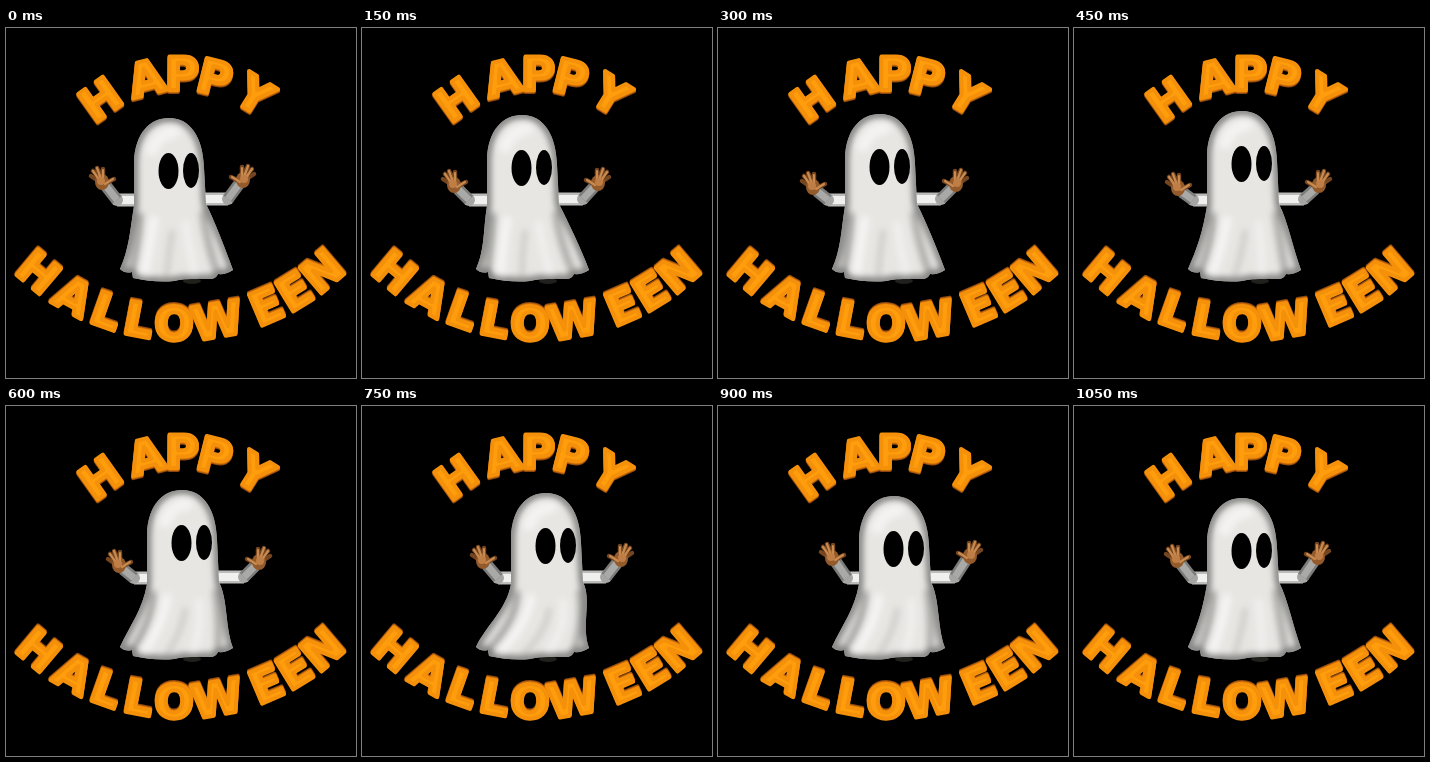
These frames come from a looping animation (350x350 px, 1.2 s). An HTML page:

```html
<!DOCTYPE html>
<html lang="en">
<head>
<meta charset="utf-8">
<title>Happy Halloween</title>
<style>
html, body { margin: 0; width: 100%; height: 100%; overflow: hidden; background: #000; }
svg { display: block; width: 100%; height: 100%; }
text { font: bold 46px "DejaVu Sans", sans-serif; text-anchor: middle; stroke-linejoin: round; stroke-width: 4px; }
.line { fill: none; stroke-linecap: round; stroke-linejoin: round; }
.sleeve { fill: none; stroke-linejoin: round; }
</style>
</head>
<body>
<svg viewBox="0 0 350 350">
  <defs>
    <filter id="soft" filterUnits="userSpaceOnUse" x="0" y="0" width="350" height="350"><feGaussianBlur stdDeviation="3"/></filter>
    <clipPath id="inside"><path class="outline"/></clipPath>
    <g id="hand">
      <path class="line" stroke="#74451f" stroke-width="4.5" d="M0 2L-9 -7M0 1L-5 -10M1 1L1 -9M2 6L12 1M-2 4L-11 -2"/>
      <ellipse cx="0" cy="4" rx="7" ry="8" fill="#935a2c"/>
      <path class="line" stroke="#c98a50" stroke-width="2.2" d="M-2 3L-9 -7M-1 1L-5 -10M1 1L1 -8M3 6L11 1"/>
      <ellipse cx="-1" cy="3" rx="4" ry="4" fill="#be7e45"/>
    </g>
  </defs>

  <rect width="350" height="350"/>
  <g id="lettering"></g>

  <ellipse cx="186" cy="253" rx="9" ry="3" fill="#20201c"/>
  <g id="arms"></g>
  <path class="outline" fill="#e7e6e3"/>
  <g clip-path="url(#inside)">
    <g class="line" filter="url(#soft)">
      <path class="outline" stroke="#6c6c6a" stroke-width="8" opacity=".85"/>
      <g id="folds"></g>
    </g>
  </g>
  <ellipse id="eyeL" rx="10" ry="18"/>
  <ellipse id="eyeR" rx="8" ry="17.5"/>
</svg>
<script>
const STEP = 150;
const HEM_LEFT = 114, HEM_RIGHT = 227;
// head x, head top, left hand x/y, right hand x/y
const POSES = [
  [163, 90,  96, 150, 237, 148],
  [160, 87,  92, 153, 236, 151],
  [162, 86,  95, 155, 238, 152],
  [168, 83, 104, 156, 245, 153],
  [176, 84, 113, 155, 253, 152],
  [184, 87, 121, 151, 259, 149],
  [176, 90, 114, 148, 252, 146],
  [168, 92, 103, 150, 244, 147]
];
const $ = id => document.getElementById(id);
const outlines = document.querySelectorAll('.outline');

// Letters stand on a circle; side is -1 for its top, 1 for its bottom.
function arcWord(word, centers, cx, cy, radius, side) {
  const glyphs = [...word].map((letter, i) => {
    const sine = (centers[i] - cx) / radius;
    const y = cy + side * radius * Math.sqrt(1 - sine * sine);
    const angle = -side * Math.asin(sine) * 180 / Math.PI;
    return { letter, place: `translate(${centers[i]} ${y}) rotate(${angle})` };
  });
  const layer = (fill, stroke, dy) => glyphs.map(({ letter, place }) =>
    `<text y="17" fill="${fill}" stroke="${stroke}" transform="translate(0 ${dy}) ${place}">${letter}</text>`).join('');
  return layer('#8a4712', '#8a4712', -side * 2) +
    layer('#c96a08', '#c96a08', -side) +
    layer('#ff9d0c', '#f4900a', 0);
}

function arm(x, y, shoulderX, shoulderY, side) {
  const wrist = [x - side * 4, y + 8];
  const elbow = [x - side * 15, shoulderY];
  const sleeve = (color, width, from, to) =>
    `<path class="sleeve" stroke="${color}" stroke-width="${width}" d="M${from}L${to}"/>`;
  return sleeve('#bcbcba', 13, elbow, [shoulderX, shoulderY]) +
    sleeve('#f0f0ee', 8, elbow, [shoulderX, shoulderY]) +
    `<circle cx="${elbow[0]}" cy="${elbow[1]}" r="6" fill="#a5a5a3"/>` +
    sleeve('#7c7c7a', 12, wrist, elbow) +
    sleeve('#a9a9a7', 7, wrist, elbow) +
    `<use href="#hand" transform="translate(${x} ${y}) scale(${-side} 1)"/>`;
}

function bodyPath(x, top) {
  const left = HEM_LEFT, right = HEM_RIGHT;
  return `M${x - 35} ${top + 44}C${x - 34} ${top + 15} ${x - 19} ${top} ${x} ${top}` +
    `C${x + 22} ${top} ${x + 34} ${top + 20} ${x + 35} ${top + 50}` +
    `L${x + 37} 176C${x + 46} 194 ${right - 8} 220 ${right} 242` +
    `Q${right - 7} 247 212 246Q210 251 204 251` +
    `Q180 250 168 253Q150 255 127 250L126 244Q119 246 ${left} 241` +
    `C${left + 9} 221 ${x - 39} 203 ${x - 35} 178Z`;
}

function foldPaths(x, top) {
  const fold = (color, width, opacity, d) =>
    `<path stroke="${color}" stroke-width="${width}" opacity="${opacity}" d="${d}"/>`;
  return fold('#777775', 7, .6, `M${x - 29} 188Q${x - 30} 215 125 246`) +
    fold('#fff', 8, .6, `M${x - 15} 192Q${x - 20} 220 139 244`) +
    fold('#8a8a88', 5, .3, `M${x + 3} 204Q${x} 226 160 250`) +
    fold('#fff', 7, .4, `M${x + 17} 196Q${x + 20} 220 188 244`) +
    fold('#777775', 7, .55, `M${x + 34} 186Q${x + 38} 215 212 247`) +
    fold('#fff', 12, .5, `M${x - 17} ${top + 32}Q${x - 10} ${top + 15} ${x + 5} ${top + 14}`);
}

function place(eye, x, y) {
  eye.setAttribute('cx', x);
  eye.setAttribute('cy', y);
}

function draw([x, top, lx, ly, rx, ry]) {
  const d = bodyPath(x, top);
  outlines.forEach(path => path.setAttribute('d', d));
  $('folds').innerHTML = foldPaths(x, top);
  $('arms').innerHTML = arm(lx, ly, x - 31, 172, -1) + arm(rx, ry, x + 35, 171, 1);
  place($('eyeL'), x - .5, top + 53);
  place($('eyeR'), x + 22, top + 52.5);
}

$('lettering').innerHTML =
  arcWord('HAPPY', [94, 140, 176, 209, 249], 175, 185, 140, -1) +
  arcWord('HALLOWEEN', [33, 68, 101, 133, 168, 211, 260, 288, 316], 174, 76, 219, 1);

const start = performance.now();
let shown = -1;
function tick() {
  const index = Math.floor((performance.now() - start) / STEP) % POSES.length;
  if (index !== shown) draw(POSES[shown = index]);
  requestAnimationFrame(tick);
}
tick();
</script>
</body>
</html>
```
